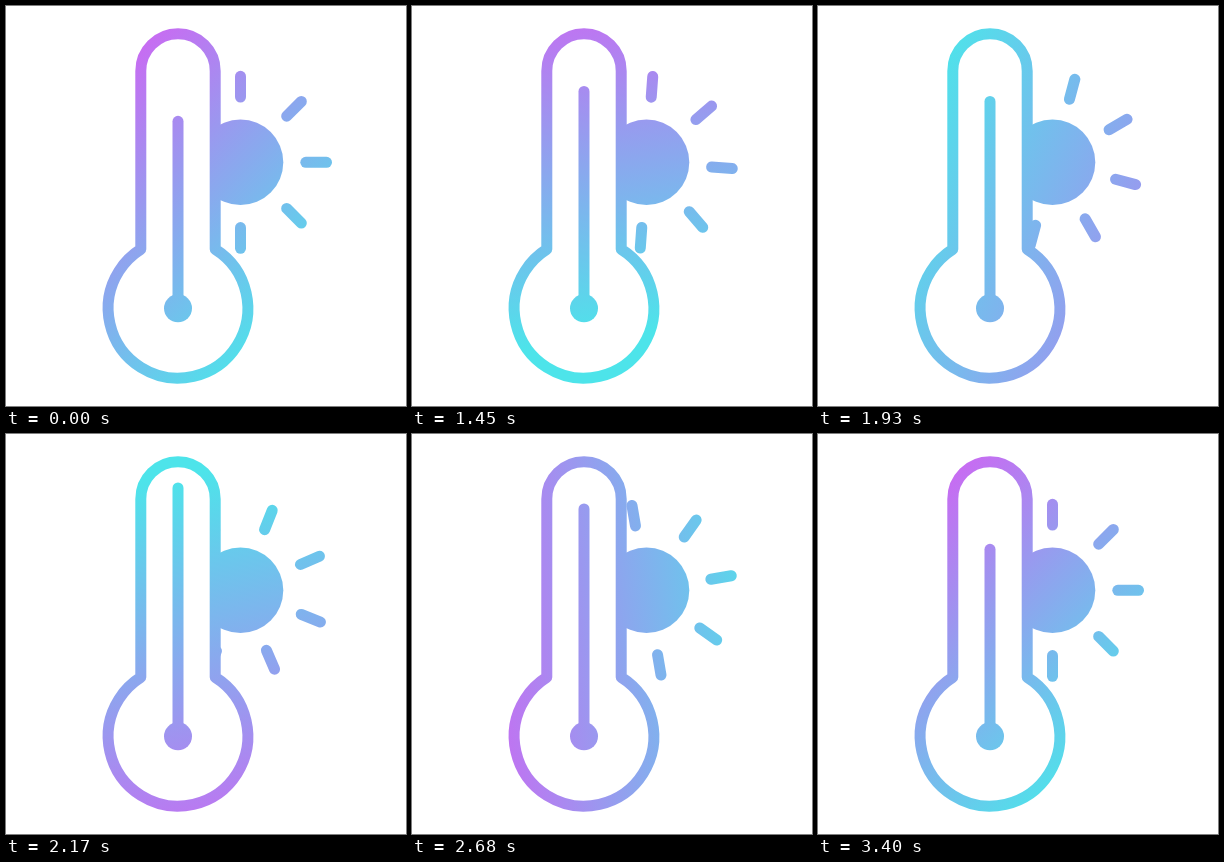
Recreate the animation shown at these times as an HTML page with a canvas. Size 400 by 400 pixels, loop 3430 ms.

```html
<!DOCTYPE html>
<html lang="en">
<head>
<meta charset="utf-8">
<title>Thermometer and sun</title>
<style>
  html, body { margin: 0; width: 100%; height: 100%; overflow: hidden; background: #fff; }
  canvas { display: block; width: 400px; height: 400px; }
</style>
</head>
<body>
<canvas id="stage" width="400" height="400"></canvas>
<script>
const ctx = document.getElementById('stage').getContext('2d');
const LOOP = 3430, START = 1000, SPAN = 2400;
const RAD = Math.PI / 180;
const sun = { x: 234.5, y: 156.3, r: 42.8, inner: 65.3, outer: 86 };
const bulb = { x: 172, y: 302.3 };

// Column top: [ms after start, y]
const levels = [[0, 115.3], [400, 84.4], [800, 109.5], [1200, 53], [2400, 115.3]];

// Gradient axis, evenly spaced keys
const axis = {
  angle: [45, 86, 211, 315, 385, 405],
  shift: [-19, -45, -53, 8, -14, -19],
  length: [307, 345, 410, 328, 300, 307]
};

const smooth = p => p * p * (3 - 2 * p);

function levelAt(ms) {
  const i = Math.max(1, levels.findIndex(k => k[0] >= ms));
  const [t0, y0] = levels[i - 1], [t1, y1] = levels[i];
  return y0 + (y1 - y0) * smooth((ms - t0) / (t1 - t0));
}

// Cubic spline through the keys, at rest on both ends
function spline(keys, p) {
  const last = keys.length - 1;
  const i = Math.min(last - 1, Math.floor(p * last));
  const u = p * last - i;
  const slope = k => k === 0 || k === last ? 0 : (keys[k + 1] - keys[k - 1]) / 2;
  const a = keys[i], b = keys[i + 1];
  return a + (b - a) * smooth(u)
    + slope(i) * u * (1 - u) * (1 - u)
    - slope(i + 1) * u * u * (1 - u);
}

function gradientAt(p) {
  const a = spline(axis.angle, p) * RAD;
  const shift = spline(axis.shift, p), half = spline(axis.length, p) / 2;
  const point = d => [215 + Math.cos(a) * d, 200 + Math.sin(a) * d];
  const g = ctx.createLinearGradient(...point(shift - half), ...point(shift + half));
  g.addColorStop(0, '#c86bf2');
  g.addColorStop(1, '#4de4ea');
  return g;
}

function line(x0, y0, x1, y1) {
  ctx.beginPath();
  ctx.moveTo(x0, y0);
  ctx.lineTo(x1, y1);
  ctx.stroke();
}

function disc(x, y, r) {
  ctx.beginPath();
  ctx.arc(x, y, r, 0, 2 * Math.PI);
  ctx.fill();
}

function drawSun(turn) {
  ctx.save();
  ctx.beginPath();
  ctx.rect(209, 0, 191, 400);
  ctx.clip();
  disc(sun.x, sun.y, sun.r);
  for (let i = 0; i < 8; i++) {
    const a = (turn + i * 45) * RAD, c = Math.cos(a), s = Math.sin(a);
    line(sun.x + c * sun.inner, sun.y + s * sun.inner,
         sun.x + c * sun.outer, sun.y + s * sun.outer);
  }
  ctx.restore();
}

function drawThermometer(level) {
  const r = 37.2, R = 69.8, neck = Math.acos(r / R);
  ctx.beginPath();
  ctx.arc(bulb.x, 65, r, Math.PI, 0);
  ctx.arc(bulb.x, bulb.y, R, -neck, Math.PI + neck);
  ctx.closePath();
  ctx.stroke();
  line(bulb.x, level, bulb.x, bulb.y);
  disc(bulb.x, bulb.y, 14);
}

function draw(now) {
  const ms = Math.min(SPAN, Math.max(0, now % LOOP - START));
  const p = ms / SPAN;
  ctx.clearRect(0, 0, 400, 400);
  ctx.fillStyle = ctx.strokeStyle = gradientAt(p);
  ctx.lineWidth = 11;
  ctx.lineCap = ctx.lineJoin = 'round';
  drawSun(45 * smooth(p));
  drawThermometer(levelAt(ms));
}

let began;
function tick(now) {
  began ??= now;
  draw(now - began);
  requestAnimationFrame(tick);
}
requestAnimationFrame(tick);
</script>
</body>
</html>
```
